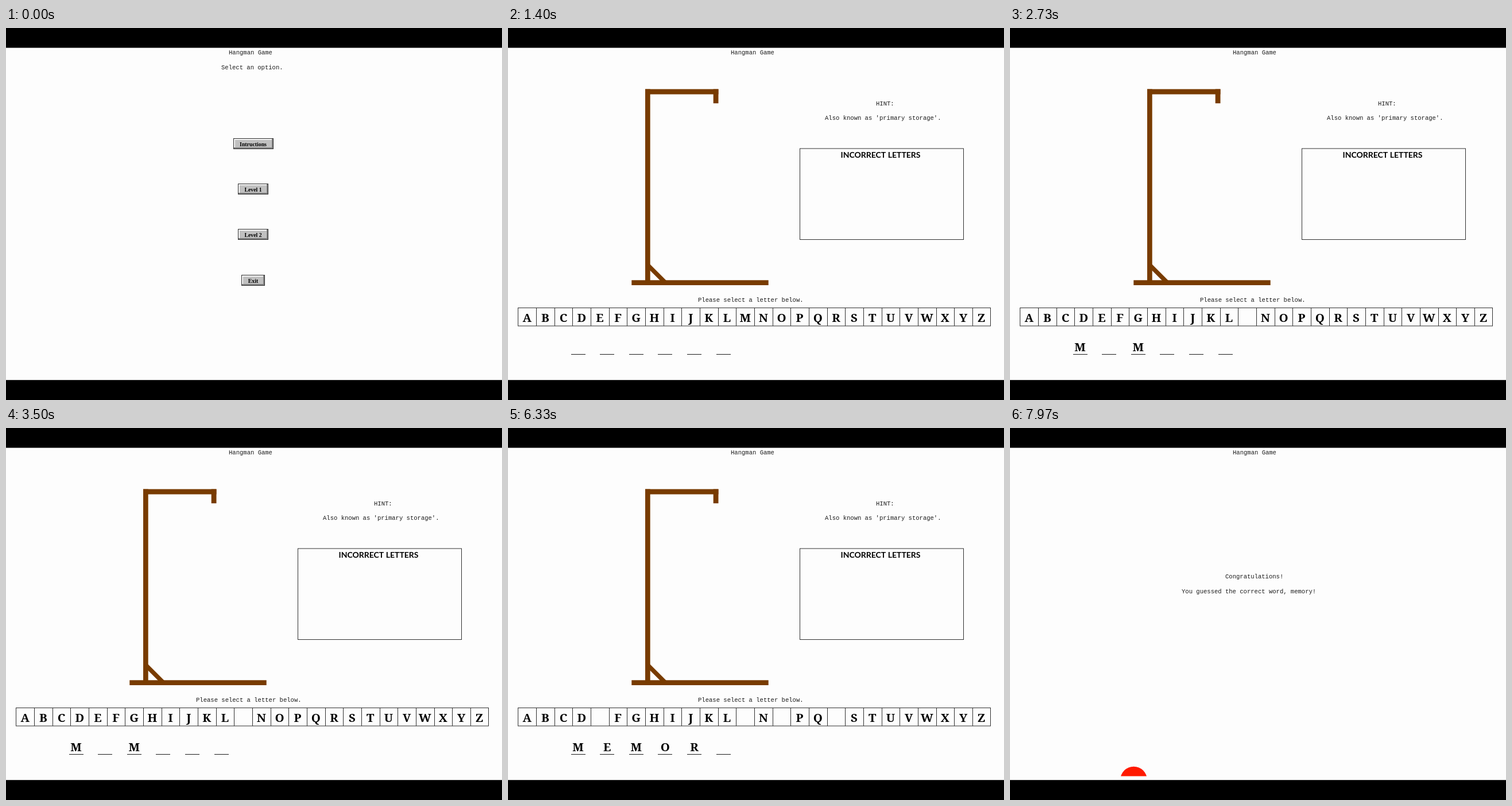
These frames come from a looping animation (864 px wide and 648 px high, 8000 ms). An HTML page with a canvas:

```html
<!DOCTYPE html>
<html lang="en">
<head>
<meta charset="utf-8">
<title>Hangman Game</title>
<style>
html, body { margin: 0; width: 100%; height: 100%; overflow: hidden; background: #000; }
canvas { display: block; }
</style>
</head>
<body>
<canvas id="stage" width="864" height="648"></canvas>
<script>
const ctx = document.getElementById('stage').getContext('2d');
const LOOP = 8000, GAME_AT = 30, WIN_AT = 7670;
const WORD = 'MEMORY';
const PICKS = { M: 2450, E: 4930, O: 5730, R: 6000, Y: 7000 };
const INK = '#1c1c1c', LINE = '#303030', WOOD = '#783b00';
const MONO = '10.55px "Liberation Mono", monospace';
const LETTER = 'bold 20.5px "Noto Serif", serif';

function text(str, x, y, font = MONO, align = 'left', color = INK) {
  ctx.font = font;
  ctx.textAlign = align;
  ctx.fillStyle = color;
  ctx.fillText(str, x, y);
}

function rect(x, y, w, h, color) {
  ctx.fillStyle = color;
  ctx.fillRect(x, y, w, h);
}

function button(label, y, w) {
  const x = Math.round(430.5 - w / 2);
  rect(x, y, w, 19, LINE);
  rect(x + 1, y + 1, w - 2, 17, '#808080');
  rect(x + 1, y + 1, w - 4, 15, '#f4f4f4');
  rect(x + 3, y + 3, w - 6, 13, '#c0c0c0');
  text(label, 430.5, y + 13.5, 'bold 9.8px "Liberation Serif", serif', 'center', '#000');
}

function drawMenu() {
  text('Select an option.', 375, 71.5);
  button('Intructions', 192, 70);
  button('Level 1', 271, 53);
  button('Level 2', 350, 53);
  button('Exit', 430, 41);
}

function drawGallows() {
  rect(239, 106.5, 127.5, 9, WOOD);
  rect(239, 106.5, 8.7, 340, WOOD);
  rect(357.7, 106.5, 8.8, 24.7, WOOD);
  rect(215.3, 439.3, 238.4, 8.7, WOOD);
  ctx.strokeStyle = WOOD;
  ctx.lineWidth = 7.5;
  ctx.beginPath();
  ctx.moveTo(243.5, 413);
  ctx.lineTo(273.5, 443);
  ctx.stroke();
}

function drawGame(t) {
  const picked = letter => t >= PICKS[letter];
  drawGallows();
  text('HINT:', 641, 135);
  text("Also known as 'primary storage'.", 552, 160);
  text('Please select a letter below.', 331, 477);
  text('INCORRECT LETTERS', 649, 226, 'bold 14px Lato, sans-serif', 'center', '#000');

  ctx.strokeStyle = LINE;
  ctx.lineWidth = 1;
  ctx.strokeRect(508.5, 210, 285, 158.5);
  ctx.strokeRect(17.5, 487.5, 823, 31.5);
  const cell = 823 / 26;
  for (let i = 0; i < 26; i++) {
    const letter = String.fromCharCode(65 + i), x = 17.5 + i * cell;
    if (i) rect(Math.round(x), 487, 1, 32, LINE);
    if (!picked(letter)) text(letter, x + cell / 2, 512, LETTER, 'center', '#000');
  }
  [...WORD].forEach((letter, i) => {
    const x = 122 + i * 50.6;
    rect(Math.round(x - 12.5), 568, 25, 1, INK);
    if (picked(letter)) text(letter, x, 563, LETTER, 'center', '#000');
  });
}

function drawWin(t) {
  text('Congratulations!', 375, 262);
  text('You guessed the correct word, memory!', 299, 287.5);
  ctx.save();
  ctx.beginPath();
  ctx.rect(0, 35, 864, 571.5);
  ctx.clip();
  ctx.fillStyle = '#ff1a00';
  ctx.beginPath();
  ctx.arc(215.5, 629 - (t - WIN_AT) * 16 / 300, 23.3, 0, 2 * Math.PI);
  ctx.fill();
  ctx.restore();
}

function draw() {
  const t = performance.now() % LOOP;
  rect(0, 0, 864, 648, '#000');
  rect(0, 34.5, 864, 578.7, '#fdfdfd');
  text('Hangman Game', 388, 46);
  if (t < GAME_AT) drawMenu();
  else if (t < WIN_AT) drawGame(t);
  else drawWin(t);
  requestAnimationFrame(draw);
}
draw();
</script>
</body>
</html>
```
